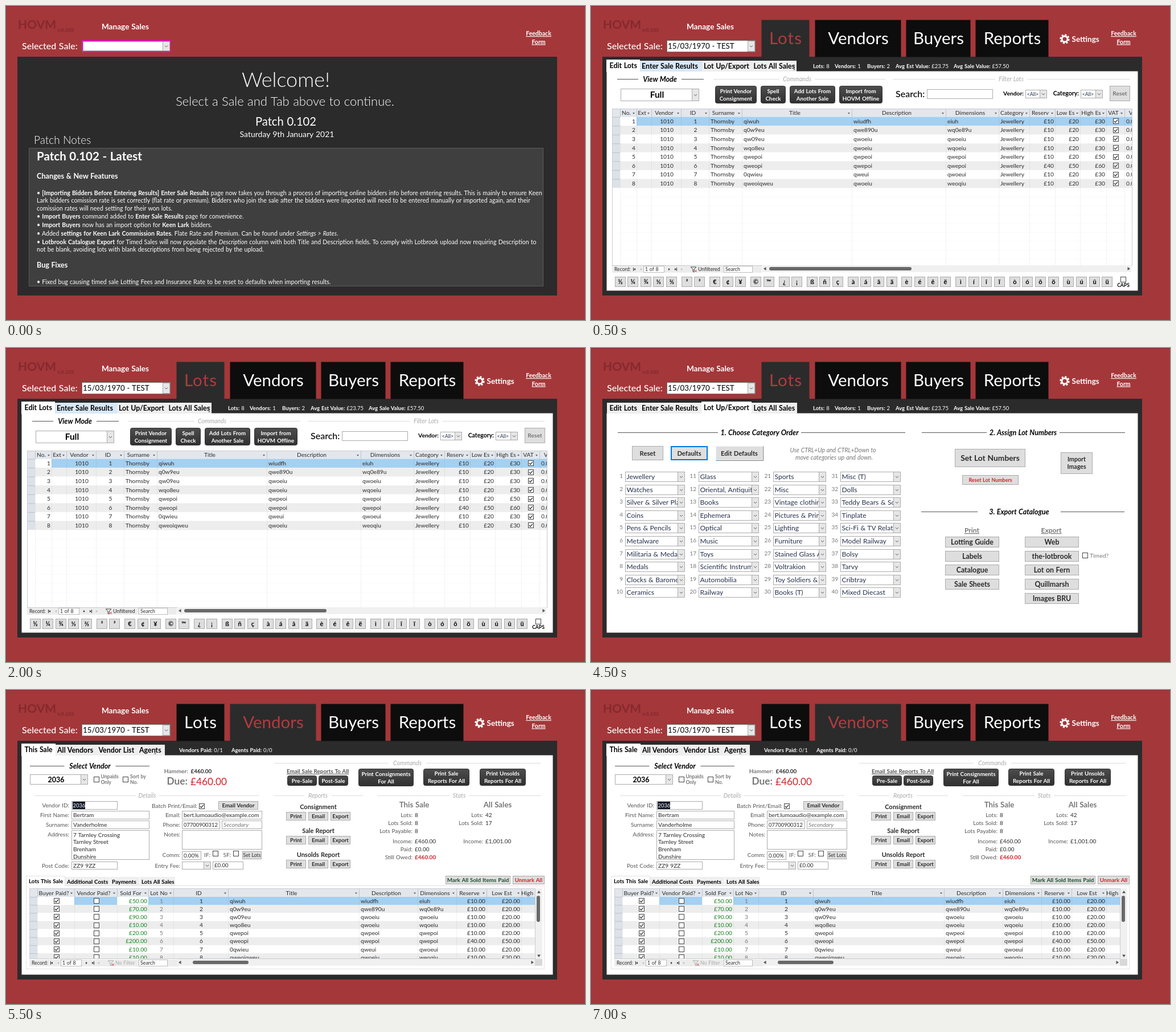
These frames come from a looping animation (1017x551 px, 8000 ms). An HTML page:

```html
<!DOCTYPE html>
<html lang="en">
<head>
<meta charset="utf-8">
<title>Sale manager</title>
<style>
html, body { margin: 0; width: 100%; height: 100%; overflow: hidden; background: #a4373a; }
#stage { display: block; font-family: Lato, sans-serif; word-spacing: .03em; }
text { fill: #2a2a2a; white-space: pre; }
.m { text-anchor: middle; }
.e { text-anchor: end; }
.b { font-weight: 700; }
.h { font-weight: 500; }
.l { font-weight: 300; }
.i { font-style: italic; }
.u { text-decoration: underline; }
.w { fill: #fff; }
.g { fill: #777; }
.d { fill: #aaa; }
.k { fill: #000; }
.r { fill: #d2232a; }
.gn { fill: #17851f; }
.moss { fill: #1d4d2b; }
.navy { fill: #24304a; }
.slate { fill: #555; }
.wine { fill: #84292d; }
.red { fill: #b23b40; }
.scene { visibility: hidden; animation: 8s step-end infinite; }
#home { animation-name: home; }
#main { animation-name: main; }
#lots { animation-name: lots; }
#export { animation-name: export; }
#vendors { animation-name: vendors; }
#lotsHead { animation-name: lotsHead; }
@keyframes home { 0% { visibility: visible } 6.25% { visibility: hidden } }
@keyframes main { 6.25%, 100% { visibility: visible } }
@keyframes lots { 6.25% { visibility: visible } 37.5% { visibility: hidden } }
@keyframes export { 37.5% { visibility: visible } 68.75% { visibility: hidden } }
@keyframes vendors { 68.75%, 100% { visibility: visible } }
@keyframes lotsHead { 6.25% { visibility: visible } 68.75% { visibility: hidden } }
</style>
</head>
<body>
<svg id="stage" width="1017" height="551" viewBox="0 0 1017 551"></svg>
<script>
const BORDER = '#ababab', DARK = '#2b2b2b';

const text = (x, y, s, cls = '', size = 10.2, extra = '') =>
  `<text x="${x}" y="${y}" class="${cls}" font-size="${size}" ${extra}>${s}</text>`;
const rect = (x, y, w, h, fill, extra = '') =>
  `<rect x="${x}" y="${y}" width="${w}" height="${h}" fill="${fill}" ${extra}/>`;
const box = (x, y, w, h, fill = '#fff', stroke = BORDER, sw = 1, rx = 0) =>
  rect(x + sw / 2, y + sw / 2, w - sw, h - sw, fill, `stroke="${stroke}" stroke-width="${sw}" rx="${rx}"`);
const path = (d, stroke, sw = 1) => `<path d="${d}" fill="none" stroke="${stroke}" stroke-width="${sw}"/>`;
const shape = (d, fill) => `<path d="${d}" fill="${fill}"/>`;
const hline = (x1, x2, y, color) => rect(x1, y, x2 - x1, 1, color);
const clip = (x, y, w, h, body) =>
  `<svg x="${x}" y="${y}" width="${w}" height="${h}" viewBox="${x} ${y} ${w} ${h}">${body}</svg>`;
const scene = (id, body) => `<g id="${id}" class="scene">${body}</g>`;
const each = (list, fn) => list.map(fn).join('');

const check = (x, y, on) => box(x, y, 10, 10, '#fff', '#444') +
  (on ? path(`M${x + 2} ${y + 5}l2 2.3 4-4.6`, '#222', 1.2) : '');
const drop = (x, y, h) => box(x, y, 13, h, '#e6e6e6') +
  path(`M${x + 4} ${y + h / 2 - 1}l2.5 2.5 2.5-2.5`, '#555');
const field = (x, y, w, h, s = '', cls = '', size = 10.2) =>
  box(x, y, w, h) + text(x + 3, y + h / 2 + size * .36, s, cls, size);
const combo = (x, y, w, h, s = '', size = 12.1) => box(x, y, w, h) +
  clip(x + 1, y, w - 14, h, text(x + 2.5, y + h / 2 + size * .36, s, 'navy', size)) + drop(x + w - 13, y, h);
const label = (x, y, w, h, s, size, cls) => {
  const lines = s.split('|');
  return each(lines, (v, i) =>
    text(x + w / 2, y + h / 2 + size * .36 + (i - (lines.length - 1) / 2) * 13, v, 'm b ' + cls, size));
};
const button = (x, y, w, h, s, size = 9.7, cls = '', stroke = BORDER, sw = 1) =>
  box(x, y, w, h, '#dedede', stroke, sw) + label(x, y, w, h, s, size, cls);
const darkButton = (x, y, w, h, s) =>
  box(x, y, w, h, 'url(#dk)', '#333', 1, 3) + label(x, y, w, h, s, 9.8, 'w');
const divider = (x1, cx, x2, y, gap, s) =>
  hline(x1, cx - gap, y, '#dcdcdc') + hline(cx + gap, x2, y, '#dcdcdc') + text(cx, y + 4, s, 'm i d', 10.7);
const heading = (x1, cx, x2, y, gap, s) =>
  hline(x1, cx - gap, y, '#555') + hline(cx + gap, x2, y, '#555') + text(cx, y + 4.5, s, 'm b i k', 12.5);
const pointer = (x, y) => path(`M${x - 2} ${y - 4}h4M${x} ${y - 4}v8M${x - 2} ${y + 4}h4`, '#555', .8);

// tabs: [left, right, text x, label, fill]
const subTabs = tabs => each(tabs, ([a, b, x, s, fill]) => {
  const on = fill == '#fff';
  return rect(a, on ? 94 : 96, b - a, on ? 22 : 19, fill) + text(x, on ? 109 : 110, s, 'b k', 12.4);
});
const stat = (x, name, v) => text(x, 109, `<tspan class="b">${name}:</tspan> ${v}`, 'w', 9.5);

const arrow = (x, y) => shape(`M${x - 2} ${y}h4l-2 2.5z`, '#555');
const tri = (x, y, dx, dy, s = 4, fill = '#555') =>
  shape(dx ? `M${x + dx * s} ${y}l${-dx * s * 1.5} ${-s}v${2 * s}z` : `M${x} ${y + dy * s}l${-s} ${-dy * s * 1.5}h${2 * s}z`, fill);

function sheet({ cols, right, y, h, head, rowH, names, align, rows, lead }) {
  const x = cols[0], end = cols[cols.length - 1], top = y + head;
  let out = rect(x, y, end - x, h, '#fff') + rect(x, y, end - x, head, '#e3e7ec');
  out += rect(x, top, cols[1] - x, rowH * rows.length, '#dde2e9');
  rows.forEach((row, j) => {
    const ry = top + j * rowH;
    const fill = j ? (j % 2 ? '#ededed' : '#fff') : '#a4d0f1';
    out += rect(cols[1], ry, end - cols[1], rowH, fill) + hline(x, cols[1], ry, '#b9c0ca');
    if (!j) out += each(lead, i => rect(cols[i], ry, cols[i + 1] - cols[i], rowH, '#fff'));
  });
  for (let ry = top + rows.length * rowH; ry < y + h; ry += rowH) out += hline(cols[1], end, ry, '#fafafa');
  cols.forEach((c, i) => {
    out += rect(c, y, 1, head, '#bfc5cd') + rect(c, top, 1, h - head, 'rgba(120,130,140,.1)');
    if (!i || !names[i - 1]) return;
    const b = cols[i + 1];
    out += text((c + b - 7) / 2, y + head / 2 + 4, names[i - 1], 'm') + arrow(b - 5, y + head / 2);
  });
  rows.forEach((row, j) => row.forEach((v, k) => {
    const a = cols[k + 1], b = cols[k + 2], mid = (a + b) / 2, cy = top + (j + .5) * rowH;
    const al = align[k];
    if (typeof v == 'boolean') out += check(Math.round(mid) - 4, Math.round(cy) - 5, v);
    else out += text(al[0] == 'e' ? b - 2 : al[0] == 'm' ? mid + 1 : a + 3, cy + 3.6, v, al);
  }));
  return clip(x, y, right - x, h, out + box(x, y, right - x, h, 'none', '#c8ccd2'));
}

const recordBar = (x, y, s, cls) => {
  const cy = y + 6;
  return rect(x - 4, y, 263, 12, '#ececec') + text(x, y + 9, 'Record:', '', 8.6) +
    rect(x + 33, cy - 3, 1, 6, '#333') + tri(x + 36, cy, -1, 0, 2, '#333') + tri(x + 47, cy, -1, 0, 2, '#bbb') +
    box(x + 51, y, 37, 12, '#fff', '#bbb') + text(x + 54, y + 9, '1 of 8', '', 8.8) +
    tri(x + 96, cy, 1, 0, 2, '#333') + tri(x + 107, cy, 1, 0, 2, '#333') + rect(x + 109, cy - 3, 1, 6, '#333') +
    tri(x + 118, cy, 1, 0, 2, '#bbb') +
    path(`M${x + 134} ${y + 2}h10l-4 4v5l-2-1v-4z`, cls ? '#aaa' : '#444') + path(`M${x + 141} ${y + 7}l4 4m0-4l-4 4`, '#c55') +
    text(x + 147, y + 9, s, cls, 8.8) + box(233, y, 51, 12, '#fff', '#bbb') + text(236, y + 9, 'Search', '', 8.8);
};
const scrollX = (x1, x2, y, a, b) => rect(x1 - 5, y - 6, x2 - x1 + 10, 12, '#f0f0f0') +
  tri(x1, y, -1, 0, 3) + tri(x2, y, 1, 0, 3) + rect(a, y - 3, b - a, 6, '#696969', 'rx="3"');

// ---- shared header ----
const base =
  `<defs><linearGradient id="dk" x2="0" y2="1"><stop stop-color="#4d4d4d"/><stop offset="1" stop-color="#303030"/></linearGradient></defs>` +
  rect(0, 0, 1017, 551, '#a4373a') + rect(0, 0, 1017, 1, '#8f2d33') + rect(0, 0, 1, 551, '#962f34') +
  text(21, 40, 'HOVM', 'b wine', 21) +
  text(90, 45, 'v.0.102', 'b wine', 9, 'font-family="Liberation Sans, sans-serif"') +
  text(209.5, 41, 'Manage Sales', 'm b w', 13.6) + text(28, 76, 'Selected Sale:', 'h w', 16) +
  text(935.5, 52, 'Feedback', 'm b u w', 10.5) + text(935.5, 66.5, 'Form', 'm b u w', 10.5) +
  rect(20, 89, 948, 419, DARK);

// ---- welcome page ----
const rich = s => s.replace(/\*(.+?)\*/g, '<tspan class="b">$1</tspan>').replace(/_(.+?)_/g, '<tspan class="i">$1</tspan>');
const notes = [
  [331.5, '• *[Importing Bidders Before Entering Results] Enter Sale Results* page now takes you through a process of importing online bidders info before entering results. This is mainly to ensure Keen'],
  [345, 'Lark bidders comission rate is set correctly (flat rate or premium). Bidders who join the sale after the bidders were imported will need to be entered manually or imported again, and their'],
  [358.5, 'comission rates will need setting for their won lots.'],
  [373, '• *Import Buyers* command added to *Enter Sale Results* page for convenience.'],
  [388, '• *Import Buyers* now has an import option for *Keen Lark* bidders.'],
  [402.5, '• Added *settings for Keen Lark Commission Rates*. Flate Rate and Premium. Can be found under _Settings &gt; Rates_.'],
  [417.5, '• *Lotbrook Catalogue Export* for Timed Sales will now populate the _Description_ column with both Title and Description fields. To comply with Lotbrook upload now requiring Description to'],
  [431, 'not be blank, avoiding lots with blank descriptions from being rejected by the upload.'],
  [487.5, '• Fixed bug causing timed sale Lotting Fees and Insurance Rate to be reset to defaults when importing results.']
];
const home =
  box(133, 60, 156, 21, '#fff', '#e312c8', 2) + box(135, 62, 152, 17) + drop(275, 62, 17) +
  text(491.5, 142, 'Welcome!', 'm l w', 36) +
  text(490, 175, 'Select a Sale and Tab above to continue.', 'm l w', 22) +
  text(491.5, 210, 'Patch 0.102', 'm w', 20.2) + text(493.5, 230, 'Saturday 9th January 2021', 'm w', 14) +
  text(49, 241.5, 'Patch Notes', 'l w', 19) +
  box(40, 249, 904, 243, '#3f3f3f', '#5c5c5c') +
  text(54, 271, 'Patch 0.102 - Latest', 'b w', 20.6) + text(54, 303, 'Changes &amp; New Features', 'b w', 12.7) +
  text(54, 459, 'Bug Fixes', 'b w', 12.6) + each(notes, ([y, s]) => text(54, y, rich(s), 'w', 10.58));

// ---- main navigation ----
const bigTab = (a, b, s, on) => rect(a - .5, 24.5, b - a, 65, on ? DARK : '#0d0d0d') +
  text((a + b) / 2, 67, s, 'm ' + (on ? 'red' : 'w'), 29.5, s == 'Lots' ? 'letter-spacing="1"' : '');
const main =
  box(133, 60, 156, 21, '#fff', '#777') + drop(275, 61, 19) + text(135, 75, '15/03/1970 - TEST', 'k', 13.3) +
  bigTab(554, 667, 'Buyers') + bigTab(676, 804, 'Reports') +
  `<g fill="none" stroke="#fff"><circle cx="832" cy="58" r="5" stroke-width="3"/>` +
  `<circle cx="832" cy="58" r="7.4" stroke-width="2.6" stroke-dasharray="3.2 2.61"/></g>` +
  text(844.5, 62.5, 'Settings', 'b w', 13.5) + rect(27.5, 114.5, 933, 385, '#fff');
const lotsHead = bigTab(300, 384, 'Lots', true) + bigTab(394, 545, 'Vendors') +
  stat(390, 'Lots', 8) + stat(428, 'Vendors', 1) + stat(485, 'Buyers', 2) +
  stat(535, 'Avg Est Value', '£23.75') + stat(637, 'Avg Sale Value', '£57.50');

// ---- lots ----
const words = s => s.split(' ');
const titles = words('qiwuh q0w9eu qw09eu wqo8eu qwepoi qweopi 0qwieu qweoiqweu');
const descs = words('wiudfh qwe890u qwoeiu qwoeiu qwpeoi qwepoi qweui qwoeiu');
const dims = words('eiuh wq0e89u qwoeiu wqoeiu qwepoi qwepoi qwoeui weoqiu');
const reserve = i => i == 5 ? 40 : 10, low = i => i == 5 ? 50 : 20, high = i => [50, 60][i - 4] || 30;

let gx = 51;
const glyphs = each(words('½¼¾⅓⅔ ²³ €¢¥ ©™ ¿¡ ßñç àáâä èéêë ìíîï òóôö ùúûü'), (group, j) => {
  if (j) gx += 4.05;
  return each([...group], c => {
    const x = Math.round(gx - 9.5);
    gx += 22.65;
    return button(x, 475, 19, 18, c, 11, 'k');
  });
});
const lots =
  subTabs([[27, 86, 32.5, 'Edit Lots', '#fff'], [86, 195, 89, 'Enter Sale Results', '#d9e8f6'],
    [195, 281, 198, 'Lot Up/Export', '#eee'], [281, 361, 285.5, 'Lots All Sales', '#eee']]) + pointer(357, 108) +
  heading(46, 121, 198, 128, 38, 'View Mode') +
  box(52, 145, 138, 22) + drop(177, 145, 22) + text(116, 161, 'Full', 'm b k', 15.4) +
  divider(215, 362, 517, 128, 31, 'Commands') + divider(530, 738, 946, 128, 28, 'Filter Lots') +
  darkButton(218, 140, 73, 31, 'Print Vendor|Consignment') + darkButton(298, 140, 44, 31, 'Spell|Check') +
  darkButton(349, 140, 80, 31, 'Add Lots From|Another Sale') + darkButton(436, 140, 76, 31, 'Import from|HOVM Offline') +
  text(535, 160, 'Search:', 'h k', 16) + box(590, 146, 116, 17) +
  text(760, 157, 'Vendor:', 'e b k', 10.3) + combo(763, 147, 38, 15, '&lt;All&gt;', 9) +
  text(857, 157, 'Category:', 'e b k', 10.5) + combo(860, 147, 39, 15, '&lt;All&gt;', 9) +
  button(911, 140, 36, 27, 'Reset', 10.2, 'g') +
  sheet({
    cols: [37, 51, 80, 106, 158, 207, 265, 458, 623, 716, 770, 815, 859, 905, 937, 971], right: 951,
    y: 180, h: 276, head: 14.5, rowH: 15.57, lead: [1],
    names: ['No.', 'Ext', 'Vendor', 'ID', 'Surname', 'Title', 'Description', 'Dimensions', 'Category', 'Reserv', 'Low Es', 'High Es', 'VAT', 'Ve'],
    align: ['e', '', 'm', 'm', '', '', '', '', '', 'e', 'e', 'e', 'm', ''],
    rows: titles.map((s, i) => [i + 1, '', 1010, i + 1, 'Thornsby', s, descs[i], dims[i], 'Jewellery',
      '£' + reserve(i), '£' + low(i), '£' + high(i), true, '0.00'])
  }) +
  recordBar(41, 456, 'Unfiltered', '') + scrollX(306, 944, 461, 313, 563) +
  glyphs + check(930, 475) + text(935, 492.5, 'CAPS', 'm b k', 8.6);

// ---- lot order and export ----
const cats = ['Jewellery', 'Watches', 'Silver &amp; Silver Plate', 'Coins', 'Pens &amp; Pencils', 'Metalware', 'Militaria &amp; Medals', 'Medals',
  'Clocks &amp; Barometers', 'Ceramics', 'Glass', 'Oriental, Antiquities', 'Books', 'Ephemera', 'Optical', 'Music', 'Toys',
  'Scientific Instruments', 'Automobilia', 'Railway', 'Sports', 'Misc', 'Vintage clothing', 'Pictures &amp; Prints', 'Lighting',
  'Furniture', 'Stained Glass Art', 'Voltrakion', 'Toy Soldiers &amp; Figures', 'Books (T)', 'Misc (T)', 'Dolls', 'Teddy Bears &amp; Soft',
  'Tinplate', 'Sci-Fi &amp; TV Related', 'Model Railway', 'Bolsy', 'Tarvy', 'Cribtray', 'Mixed Diecast'];
const slots = [[60, 105], [189, 106], [320, 93], [438, 106]];
const stack = (x, names) => each(names, (s, i) => button(x, Math.round(331 + i * 24.7), 95, 19, s, 12.4));
const exportPage =
  subTabs([[28, 85, 32.5, 'Edit Lots', '#eee'], [85, 194, 89, 'Enter Sale Results', '#eee'],
    [194, 282, 198, 'Lot Up/Export', '#fff'], [282, 362, 285.5, 'Lots All Sales', '#eee']]) + pointer(296, 107) +
  heading(47, 296, 552, 148, 73, '1. Choose Category Order') + heading(581, 759, 938, 148, 64, '2. Assign Lot Numbers') +
  heading(580, 752, 937, 287, 73, '3. Export Catalogue') +
  button(72, 172, 55, 25, 'Reset', 11.2) + button(140, 172, 65, 25, 'Defaults', 11.2, '', '#0078d7', 2) +
  button(219, 172, 83, 25, 'Edit Defaults', 11.2, '', '#f2f2f2') + path('M219 197.5h83.5v-25', '#777') +
  text(425, 183, 'Use CTRL+Up and CTRL+Down to', 'm i g', 10.5) + text(427, 196, 'move categories up and down.', 'm i g', 10.7) +
  each(cats, (s, i) => {
    const [x, w] = slots[i / 10 | 0], y = Math.round(217 + i % 10 * 22.6);
    return text(x - 4, y + 11, i + 1, 'e g', 10) + combo(x, y, w, 18, s);
  }) +
  button(639, 177, 124, 32, 'Set Lot Numbers', 13.8) + button(652, 223, 99, 17, 'Reset Lot Numbers', 8.9, 'r') +
  button(825, 183, 56, 38, 'Import|Images', 10.6) +
  text(669, 324, 'Print', 'm b u g', 12.1) + text(808.5, 324, 'Export', 'm b u g', 12.1) +
  stack(622, ['Lotting Guide', 'Labels', 'Catalogue', 'Sale Sheets']) +
  stack(762, ['Web', 'the-lotbrook', 'Lot on Fern', 'Quillmarsh', 'Images BRU']) +
  check(863, 359) + text(876, 368, 'Timed?', 'g', 10.4);

// ---- vendors ----
const tag = (x, y, s) => text(x, y, s, 'e slate', 10);
const report = (y, s) => text(548.5, y, s, 'm b', 11) +
  each(['Print', 'Email', 'Export'], (v, i) => button(492 + i * 39, y + 5, 35, 15, v, 9.6));
const sold = [50, 70, 90, 10, 20, 200, 10, 10];
const total = (x, y, s, v, cls = '') => tag(x, y, s) + text(x + 4, y, v, cls, 10);
const vendors =
  bigTab(300, 384, 'Lots') + bigTab(394, 545, 'Vendors', true) +
  subTabs([[27, 87, 32.5, 'This Sale', '#fff'], [87, 158, 90, 'All Vendors', '#eee'],
    [158, 230, 162.5, 'Vendor List', '#eee'], [230, 279, 234, 'Agents', '#eee']]) + pointer(262, 108) +
  stat(304, 'Vendors Paid', '0/1') + stat(396, 'Agents Paid', '0/0') +
  heading(42, 147.5, 252, 133, 45, 'Select Vendor') +
  box(42, 148, 102, 18) + drop(131, 148, 18) + text(88, 161.5, '2036', 'm b k', 12.5) +
  check(154, 152) + text(166.5, 155, 'Unpaids', 'b g', 8.6) + text(166.5, 165, 'Only', 'b g', 8.6) +
  check(205, 152) + text(218, 155, 'Sort by', 'b g', 8.6) + text(218, 165, 'No.', 'b g', 8.6) +
  text(320, 145.5, 'Hammer:', 'e b g', 10.3) + text(324.5, 145.5, '£460.00', 'b', 9.9) +
  text(319, 166, 'Due:', 'e b g', 17.3) + text(324, 166.5, '£460.00', 'r', 17.2) +
  divider(471, 705, 939, 128, 33, 'Commands') +
  text(547.5, 146, 'Email Sale Reports To All', 'm b u slate', 9.9) +
  darkButton(494, 150, 52, 18, 'Pre-Sale') + darkButton(549, 150, 52, 18, 'Post-Sale') +
  darkButton(619, 138, 97, 31, 'Print Consignments|For All') + darkButton(733, 138, 81, 30, 'Print Sale|Reports For All') +
  darkButton(832, 138, 81, 30, 'Print Unsolds|Reports For All') +
  divider(51, 248, 445, 185, 20, 'Details') + divider(471, 548, 627, 185, 24, 'Reports') + divider(653, 796, 939, 185, 17, 'Stats') +
  each([[206, 'Vendor ID:'], [223, 'First Name:'], [240, 'Surname:'], [257, 'Address:'], [311.5, 'Post Code:']], ([y, s]) => tag(111, y, s)) +
  box(115, 195, 81, 15) + rect(117, 196, 22, 13, '#111827') + text(117.5, 206, '2036', 'w', 9.4) +
  field(115, 212, 137, 15, 'Bertram') + field(115, 229, 137, 15, 'Vanderholme') + box(115, 246, 137, 52) +
  each(['7 Tarnley Crossing', 'Tarnley Street', 'Brenham', 'Dunshire'], (s, i) => text(118, 257.5 + i * 12.7, s)) +
  field(115, 301, 81, 14, 'ZZ9 9ZZ') +
  tag(336, 207, 'Batch Print/Email:') + check(339, 199, true) + button(373, 195, 70, 15, 'Email Vendor', 9.7) +
  each([[223, 'Email:'], [240, 'Phone:'], [257, 'Notes:'], [293, 'Comm:'], [311.5, 'Entry Fee:']], ([y, s]) => tag(306, y, s)) +
  field(309, 212, 141, 15, 'bert.lumoaudio@example.com', '', 10) + field(309, 229, 67, 15, '07700900312', '', 9.4) +
  field(379, 229, 71, 15, 'Secondary', 'i g') + box(309, 246, 141, 34) + field(309, 283, 34, 15, '0.00%', '', 9.6) +
  tag(359, 292.5, 'IF:') + check(363, 282) + tag(395, 292.5, 'SF:') + check(399, 282) +
  box(415, 283, 34, 14, '#dedede') + text(432, 293, 'Set Lots', 'm', 8.7) +
  combo(309, 301, 51, 14) + field(363, 301, 54, 14, '£0.00', '', 9.6) +
  report(209, 'Consignment') + report(251, 'Sale Report') + report(293, 'Unsolds Report') +
  text(717, 206, 'This Sale', 'm b g', 13.3) + text(863.5, 206, 'All Sales', 'm b g', 13.3) +
  total(714, 222.5, 'Lots:', 8) + total(714, 236.5, 'Lots Sold:', 8) + total(714, 250.5, 'Lots Payable:', 8) +
  total(714, 268.5, 'Income:', '£460.00') + total(714, 282.5, 'Paid:', '£0.00') + total(714, 296.5, 'Still Owed:', '£460.00', 'b r') +
  total(838, 222.5, 'Lots:', 42) + total(838, 236.5, 'Lots Sold:', 17) + total(838, 268.5, 'Income:', '£1,001.00') +
  box(35, 343, 911, 147, '#fff', '#e2e2e2') +
  each([[104, 182, 107, 'Additional Costs'], [183, 234, 186, 'Payments'], [235, 297, 238, 'Lots All Sales']],
    ([a, b, x, s]) => rect(a, 328, b - a, 15, '#efefef') + text(x, 339.5, s, 'b k', 9.8)) +
  path('M35.5 344v-17.5h68v17', '#e2e2e2') + rect(36, 342, 67, 3, '#fff') + text(40, 338.5, 'Lots This Sale', 'b k', 9.9) +
  button(772, 326, 114, 15, 'Mark All Sold Items Paid', 9.9, 'moss') + button(890, 326, 56, 15, 'Unmark All', 9.7, 'r') +
  sheet({
    cols: [41, 55, 120, 195, 250, 294, 390, 620, 723, 791, 844, 905, 950], right: 930,
    y: 348, h: 124, head: 15, rowH: 14.15, lead: [1, 3],
    names: ['Buyer Paid?', 'Vendor Paid?', 'Sold For', 'Lot No', 'ID', 'Title', 'Description', 'Dimensions', 'Reserve', 'Low Est', 'High Est'],
    align: ['m', 'm', 'e gn', 'm g', 'm', '', '', '', 'e', 'e', ''],
    rows: titles.map((s, i) => [true, false, `£${sold[i]}.00`, i + 1, i + 1, s, descs[i], dims[i], `£${reserve(i)}.00`, `£${low(i)}.00`, ''])
  }) +
  rect(930, 348, 12, 124, '#f0f0f0') + tri(936, 355, 0, -1, 3) + tri(936, 466, 0, 1, 3) + rect(932, 361, 6, 46, '#696969', 'rx="3"') +
  recordBar(45, 473, 'No Filter', 'd') + scrollX(306, 924, 478, 328, 426) + rect(929, 472, 13, 12, '#d8d8d8');

document.getElementById('stage').innerHTML = base + scene('home', home) + scene('main', main) +
  scene('lotsHead', lotsHead) + scene('lots', lots) + scene('export', exportPage) + scene('vendors', vendors);
</script>
</body>
</html>
```
